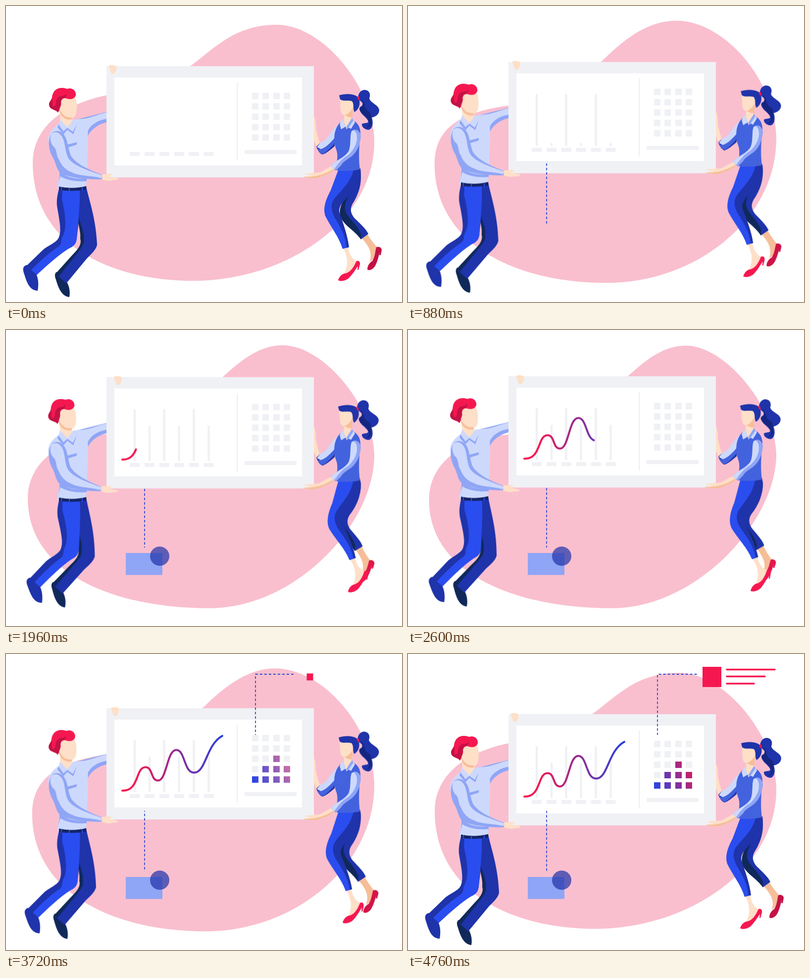
Write an HTML page without scripts that moves like this. It is 800x600 px and loops after 4800 ms.

```html
<!DOCTYPE html>
<html lang="en">
<head>
<meta charset="utf-8">
<title>Dashboard carried by two people</title>
<style>
html, body { margin: 0; width: 100%; height: 100%; overflow: hidden; background: #fff; }
svg { display: block; width: 100vw; height: 100vh; }

:root { --loop: 4.8s; --sine: cubic-bezier(.37, 0, .63, 1); }

/* floating, shared by the board and both people */
.float { animation: float 2.4s var(--sine) infinite alternate; }
.sway { animation: sway 2.4s var(--sine) infinite alternate; }
@keyframes float { to { transform: translateY(-28.7px); } }
@keyframes sway { to { transform: translateX(var(--x, 0px)) rotate(var(--a, 0deg)); } }

.blob { fill: #f9bfcf; animation: blob 2.4s infinite alternate; }
@keyframes blob {
  0% { d: path("M54 318C54 250 110 200 203 181C290 165 330 150 372 122C420 88 460 38 547 38C640 38 744 165 744 275C744 440 560 557 380 557C205 557 54 480 54 318Z"); animation-timing-function: cubic-bezier(.33, 0, .67, .33); }
  33.3% { d: path("M54 318C54 250 100 215 203 201C300 185 345 155 388 114C425 78 475 30 542 30C640 30 744 155 744 270C744 435 580 561 400 561C215 561 54 480 54 318Z"); animation-timing-function: linear; }
  61.7% { d: path("M51 330C51 262 105 222 203 208C315 195 360 150 411 102C450 65 495 28 545 28C645 28 744 145 744 262C744 420 590 564 408 564C212 564 51 485 51 330Z"); animation-timing-function: cubic-bezier(.33, .67, .67, 1); }
  100% { d: path("M42 345C42 270 110 220 203 212C330 202 380 145 445 94C480 62 515 32 563 32C642 32 744 160 744 252C744 385 585 564 411 564C210 564 42 490 42 345Z"); }
}

/* lines that draw themselves */
.draw { fill: none; stroke-dasharray: 1 2; stroke-dashoffset: 1.02; animation: var(--loop) var(--sine) infinite; }
.tall { animation-name: tall; }
.short { animation-name: short; }
.lead1 { animation-name: lead1; animation-timing-function: linear; }
.lead2 { animation-name: lead2; animation-timing-function: linear; }
.curve { animation-name: curve; }
.note { animation-name: note; }
@keyframes tall { 0%, 4% { stroke-dashoffset: 1.02; } 16.7%, 100% { stroke-dashoffset: 0; } }
@keyframes short { 0%, 15.8% { stroke-dashoffset: 1.02; } 28.3%, 100% { stroke-dashoffset: 0; } }
@keyframes lead1 { 0%, 9% { stroke-dashoffset: 1.02; } 18%, 100% { stroke-dashoffset: 0; } }
@keyframes lead2 { 0%, 60% { stroke-dashoffset: 1.02; } 71.5%, 100% { stroke-dashoffset: 0; } }
@keyframes curve { 0%, 33.3% { stroke-dashoffset: 1.02; } 66%, 100% { stroke-dashoffset: 0; } }
@keyframes note { 0%, 82% { stroke-dashoffset: 1.02; } 92.5%, 100% { stroke-dashoffset: 0; } }

.dashes { fill: none; stroke: #2f49d0; stroke-width: 1.8; stroke-dasharray: 5 4; animation: march .8s linear infinite; }
@keyframes march { to { stroke-dashoffset: -9; } }

/* shapes that pop in with a small overshoot */
.pop { transform-box: fill-box; transform-origin: center; animation: var(--loop) ease-out infinite; }
.card { animation-name: card; }
.dot { animation-name: dot; }
.tag { animation-name: tag; }
@keyframes card { 0%, 19% { transform: scale(0); } 25% { transform: scale(1.1); } 29%, 100% { transform: none; } }
@keyframes dot { 0%, 23% { transform: scale(0); } 29% { transform: scale(1.1); } 33%, 100% { transform: none; } }
@keyframes tag { 0%, 76% { transform: scale(0); } 83.5% { transform: scale(1.1); } 88%, 100% { transform: none; } }

.tint1 { animation: tint1 var(--loop) infinite linear; }
.tint2 { animation: tint2 var(--loop) infinite linear; }
@keyframes tint1 { 0%, 62.5% { stop-color: #f0f1f5; } 71%, 100% { stop-color: #2a45e2; } }
@keyframes tint2 { 0%, 68% { stop-color: #f0f1f5; } 70% { stop-color: #dfe4f8; } 83%, 100% { stop-color: #dc1c58; } }

.gray { fill: #f0f1f5; }
.skin { fill: #fedfc8; }
.blush { fill: #f6be98; }
.red { fill: #f51850; }
.wine { fill: #c41245; }
.heel { fill: #c41245; animation: heel 2.4s var(--sine) infinite alternate; }
@keyframes heel { to { fill: #e5174c; } }
.pale { fill: #cdd9fc; }
.shade { fill: #8fa5f5; }
.knit { fill: #4362de; }
.bright { fill: #2a4df0; }
.blue { fill: #1f33aa; }
.navy { fill: #10295a; }
</style>
</head>
<body>
<svg viewBox="0 0 800 600">
  <defs>
    <linearGradient id="trend" gradientUnits="userSpaceOnUse" x1="262" y1="0" x2="437" y2="0">
      <stop stop-color="#f51850"/><stop offset="1" stop-color="#2540e0"/>
    </linearGradient>
    <linearGradient id="heat" gradientUnits="userSpaceOnUse" x1="500" y1="270" x2="576" y2="232">
      <stop class="tint1"/><stop class="tint2" offset="1"/>
    </linearGradient>
    <mask id="reveal1" maskUnits="userSpaceOnUse" x="0" y="0" width="800" height="600">
      <path class="draw lead1" pathLength="1" stroke="#fff" stroke-width="8" d="M280 318V441"/>
    </mask>
    <mask id="reveal2" maskUnits="userSpaceOnUse" x="0" y="0" width="800" height="600">
      <path class="draw lead2" pathLength="1" stroke="#fff" stroke-width="8" d="M504 164V41H584"/>
    </mask>
    <rect id="cell" width="13" height="13"/>
    <g id="row">
      <use href="#cell" x="497"/><use href="#cell" x="518"/><use href="#cell" x="540"/><use href="#cell" x="561"/>
    </g>
  </defs>

  <path class="blob" d="M54 318C54 250 110 200 203 181C290 165 330 150 372 122C420 88 460 38 547 38C640 38 744 165 744 275C744 440 560 557 380 557C205 557 54 480 54 318Z"/>

  <rect class="pop card" x="242" y="452" width="74" height="44.5" fill="#8fa5f5"/>
  <circle class="pop dot" cx="310.5" cy="458.5" r="19.5" fill="#1e32aa" opacity=".7"/>

  <g class="float">
    <!-- man: far arm and legs -->
    <path class="shade" d="M143 230L206 214V235C188 239 174 247 165 264L150 260Z"/>
    <path class="pale" d="M140 230C165 231 185 219 206 215V228C186 231 169 241 164 257L150 260Z"/>
    <g class="sway" style="--a:2.5deg;transform-origin:150px 370px">
      <path class="navy" d="M102 539C98 543 98 547 101 555C105 569 112 589 128 590C130 580 128 567 122 558Z"/>
      <path class="blue" d="M140 371H163C170 400 182 435 184 484C182 494 173 502 164 511L122 562L100 543L149 489C155 480 157 470 153 460C147 440 145 415 140 371Z"/>
      <path class="navy" d="M145 408C146 440 160 455 157 474C160 484 146 498 137 510L107 548L100 543L132 507C143 496 154 484 150 472C152 455 143 440 143 408Z"/>
    </g>
    <g class="sway" style="--a:-2.6deg;transform-origin:125px 370px">
      <path class="blue" d="M42 525C35 527 33 532 36 541C41 556 46 577 64 577C66 566 66 554 61 543Z"/>
      <path class="blue" d="M107 371H148C152 400 148 430 143 470C142 482 137 487 126 492C105 505 84 525 62 545L41 527L75 494C86 485 105 478 107 468C113 455 107 430 103 405C102 392 104 382 107 371Z"/>
      <path class="bright" d="M114 371H149C150 405 146 435 143 470C142 482 137 487 126 492C105 505 84 525 62 545L51 535C65 520 86 501 107 487C114 481 109 475 116 464C124 445 118 412 113 392Z"/>
    </g>
    <!-- man: torso -->
    <path class="pale" d="M108 238C96 246 86 256 85 270C88 292 102 312 107 336C108 350 105 360 103 369C120 375 145 374 162 371C163 330 167 290 165 228L140 230Z"/>
    <path class="shade" d="M107 330C112 345 137 351 163 350V355C140 357 120 352 110 345L104 364C108 352 109 342 107 330Z"/>
    <path fill="#142466" d="M107 366Q135 372 162 365L163 372Q135 377 107 373Z"/>
    <path class="bright" d="M111 367h2v7h-2zM127 369h2v7h-2zM153 368h2v7h-2z"/>
    <path class="shade" d="M124 281L143 276V281L124 287Z"/>

    <!-- man: head -->
    <g class="sway" style="--a:-3.1deg;transform-origin:120px 235px">
      <path class="skin" d="M108 194L110 236L123 247L134 235V227C142 225 143 213 143 203C143 194 141 188 139 184L114 184Z"/>
      <path class="blush" d="M108 209C113 221 122 227 133 226V230C121 232 112 226 108 215Z"/>
      <path class="red" d="M105 216C101 209 88 211 87 200C87 193 93 191 93 184C95 171 104 165 114 166C120 166 122 169 128 167C136 167 142 173 141 181C138 190 128 190 121 187C115 186 112 190 111 195C113 200 108 207 108 211Z"/>
      <path class="wine" d="M105 216C101 209 88 211 87 200C87 194 92 191 93 186C96 193 91 199 96 204C103 203 99 194 103 189C107 178 119 186 122 177C124 184 119 187 114 187C109 192 113 198 108 207Z"/>
    </g>
    <path class="pale" d="M109 230L124 246L137 229L143 238L135 256L124 248L116 256L106 242Z"/>
    <path class="shade" d="M106 240L116 254L124 247L135 255L143 240L136 260L124 251L116 260L104 246Z"/>

    <!-- woman: far hand and arm -->
    <path class="skin" d="M621 222C625 225 626 235 626 249C629 262 631 269 634 278L627 284L620 268Z"/>
    <path class="blue" d="M627 285L634 278C646 281 655 270 665 262L664 284C654 293 645 300 639 301C634 299 629 292 627 285Z"/>
    <path class="pale" d="M628 286L635 277C647 276 655 255 669 242L671 262C660 278 648 290 639 292Z"/>
    <path class="knit" d="M629 289C638 294 652 282 665 266V277C654 290 644 299 639 300C635 298 631 294 629 289Z"/>

    <!-- woman: legs -->
    <g class="sway" style="--a:5.8deg;transform-origin:695px 340px">
      <path class="blush" d="M718 470L730 462C737 475 746 484 751 491L745 511L735 519C740 500 735 489 718 470Z"/>
      <path class="heel" d="M730 534C730 525 736 519 740 517C746 507 746 496 748 489C754 487 759 490 759 495L757 505H754L755 499C752 510 750 520 745 528C740 535 733 537 730 534Z"/>
      <path class="blue" d="M684 350L716 333C720 360 712 382 700 401C694 413 697 421 704 430C716 442 727 451 732 462L717 473C705 455 684 446 676 428C671 413 679 397 690 380Z"/>
      <path class="navy" d="M701 370C692 385 683 399 685 413C690 431 708 439 717 462L717 473C705 455 684 446 676 428C671 413 679 397 690 380Z"/>
    </g>
    <g class="sway" style="--a:-5.7deg;transform-origin:695px 340px">
      <path class="skin" d="M681 490L691 487C693 505 701 514 709 518L700 537L683 543C692 525 691 510 681 490Z"/>
      <path class="red" d="M671 556C673 548 680 542 686 542C697 539 703 528 708 517C713 515 716 519 715 524L712 535H710L711 527C705 536 699 545 693 551C687 557 676 559 671 556Z"/>
      <path class="blue" d="M672 331L716 329C719 350 713 364 702 375C688 390 672 402 673 417C681 440 690 464 693 489L680 492C673 468 656 448 645 425C640 408 647 391 656 374Z"/>
      <path class="bright" d="M672 331L703 330C697 355 681 370 668 385C655 398 655 412 664 429C676 449 686 466 688 490L680 492C673 468 656 448 645 425C640 408 647 391 656 374Z"/>
    </g>

    <!-- woman: torso and head -->
    <path class="knit" d="M675 236L705 234C713 240 717 250 716 262C713 285 712 310 715 331C700 335 684 335 668 333C665 320 674 306 666 288C661 270 662 250 675 236Z"/>
    <g class="sway" style="--a:-2.4deg;transform-origin:690px 240px">
      <path class="blue" d="M711 188C711 178 716 170 725 170C735 171 737 180 734 187C736 197 753 200 754 211C754 221 744 225 739 226C742 235 742 248 733 251C725 251 718 245 719 239C725 236 734 239 731 232C727 224 714 218 714 207C716 202 722 204 721 197Z"/>
      <path fill="#14267e" d="M718 189C728 199 721 207 733 214C741 219 736 225 738 232C739 241 735 247 727 247C736 242 735 235 731 229C726 221 716 217 714 209C717 203 724 204 718 189Z"/>
      <path class="skin" d="M675 188L703 184L704 205L698 221V236L688 250L683 236V221C674 219 676 207 675 188Z"/>
      <path class="blush" d="M684 221C692 219 698 212 702 204L699 226C694 226 689 224 684 221Z"/>
      <path class="blue" d="M673 181C685 177 706 177 713 187C717 198 713 210 704 215C700 208 704 199 699 193C690 190 680 194 675 189Z"/>
      <path class="red" d="M709 184L713 183L715 189L712 191Z"/>
    </g>
    <path class="pale" d="M680 229L687 246L699 227L705 236L697 249L687 244L677 250L674 239Z"/>
    <path class="shade" d="M687 246L699 227L702 232L691 248Z"/>
  </g>

  <g class="float">
    <!-- board -->
    <rect class="gray" x="203" y="122" width="419" height="225.5"/>
    <rect x="219" y="145" width="379" height="178" fill="#fff"/>
    <path class="gray" d="M466 155h2.5v158h-2.5zM482 292h105v8h-105z"/>
    <path stroke="#f0f1f5" stroke-width="8" stroke-dasharray="20 9.9" d="M250 300H420"/>
    <g class="gray">
      <use href="#row" y="176"/><use href="#row" y="197"/><use href="#row" y="218"/><use href="#row" y="239"/><use href="#row" y="260"/>
    </g>
    <path fill="url(#heat)" d="M497 260h13v13h-13zM518 260h13v13h-13zM540 260h13v13h-13zM561 260h13v13h-13zM518 239h13v13h-13zM540 239h13v13h-13zM561 239h13v13h-13zM540 218h13v13h-13z"/>
    <g stroke="#f0f1f5" stroke-width="4.5">
      <path class="draw tall" pathLength="1" d="M260 292V187"/>
      <path class="draw tall" pathLength="1" d="M319.5 292V187"/>
      <path class="draw tall" pathLength="1" d="M379.5 292V187"/>
      <path class="draw short" pathLength="1" d="M290 292V220.5"/>
      <path class="draw short" pathLength="1" d="M349.5 292V220.5"/>
      <path class="draw short" pathLength="1" d="M409.5 292V220.5"/>
    </g>
    <path class="draw curve" pathLength="1" stroke="url(#trend)" stroke-width="4" stroke-linecap="round" d="M235 289C270 290 261 241.500 282 241.500C297 241.500 292 268.500 307 268.500C325 268.500 325 206.500 344 206.500C362 206.500 359 252.500 380 252.500C404 252.500 404 196 437 178"/>

    <!-- hands and near arms -->
    <path class="skin sway" style="--x:11.5px" d="M207 122C210 118 219 120 223 122C224 128 222 135 217 138C211 138 211 132 209 127Z"/>
    <g class="sway" style="--a:1.4deg;transform-origin:105px 265px">
      <path class="skin" d="M191 342C198 341 204 340 213 340C217 343 211 344 208 345L227 349C229 352 224 353 217 353C205 356 200 353 191 350Z"/>
      <path class="shade" d="M92 259C94 253 107 251 113 257C125 266 124 285 131 303C140 319 165 331 194 342V351C165 352 135 349 115 341C101 335 102 318 94 306C85 289 84 270 92 259Z"/>
      <path class="pale" d="M92 259C98 253 107 256 112 263C121 275 118 296 127 310C138 324 164 333 194 343L193 349C170 343 148 345 135 338C120 333 111 322 107 311C101 304 104 290 95 284C88 274 89 265 92 259Z"/>
    </g>
    <g class="sway" style="--x:-2px">
      <path class="skin" d="M658 324L664 332C655 340 642 344 632 348C621 351 610 348 602 347C602 345 612 345 617 344L603 341C608 338 625 339 635 337Z"/>
      <path class="blush" d="M602 346C622 347 642 343 662 330L664 332C655 340 642 344 632 348C621 351 610 348 602 347Z"/>
    </g>
    <path class="shade" d="M698 254C706 246 716 253 717 264C715 284 708 297 698 305C687 313 681 316 677 323L666 334L656 324C667 312 682 309 692 295C698 280 694 266 698 254Z"/>
    <path class="pale" d="M698 254C703 249 709 256 709 266C710 280 700 295 690 303C680 309 673 316 663 331L656 324C667 312 682 309 692 295C698 280 694 266 698 254Z"/>
  </g>

  <!-- callouts -->
  <g mask="url(#reveal1)"><path class="dashes" d="M280 318V441"/></g>
  <g mask="url(#reveal2)"><path class="dashes" d="M504 164V41H584"/></g>
  <rect class="pop tag red" x="595" y="26" width="38" height="41"/>
  <g stroke="#f51850" stroke-width="3.5" stroke-linecap="round">
    <path class="draw note" pathLength="1" d="M644 31.5H741"/>
    <path class="draw note" pathLength="1" d="M644 45.5H721"/>
    <path class="draw note" pathLength="1" d="M644 60H699"/>
  </g>
</svg>
</body>
</html>
```
